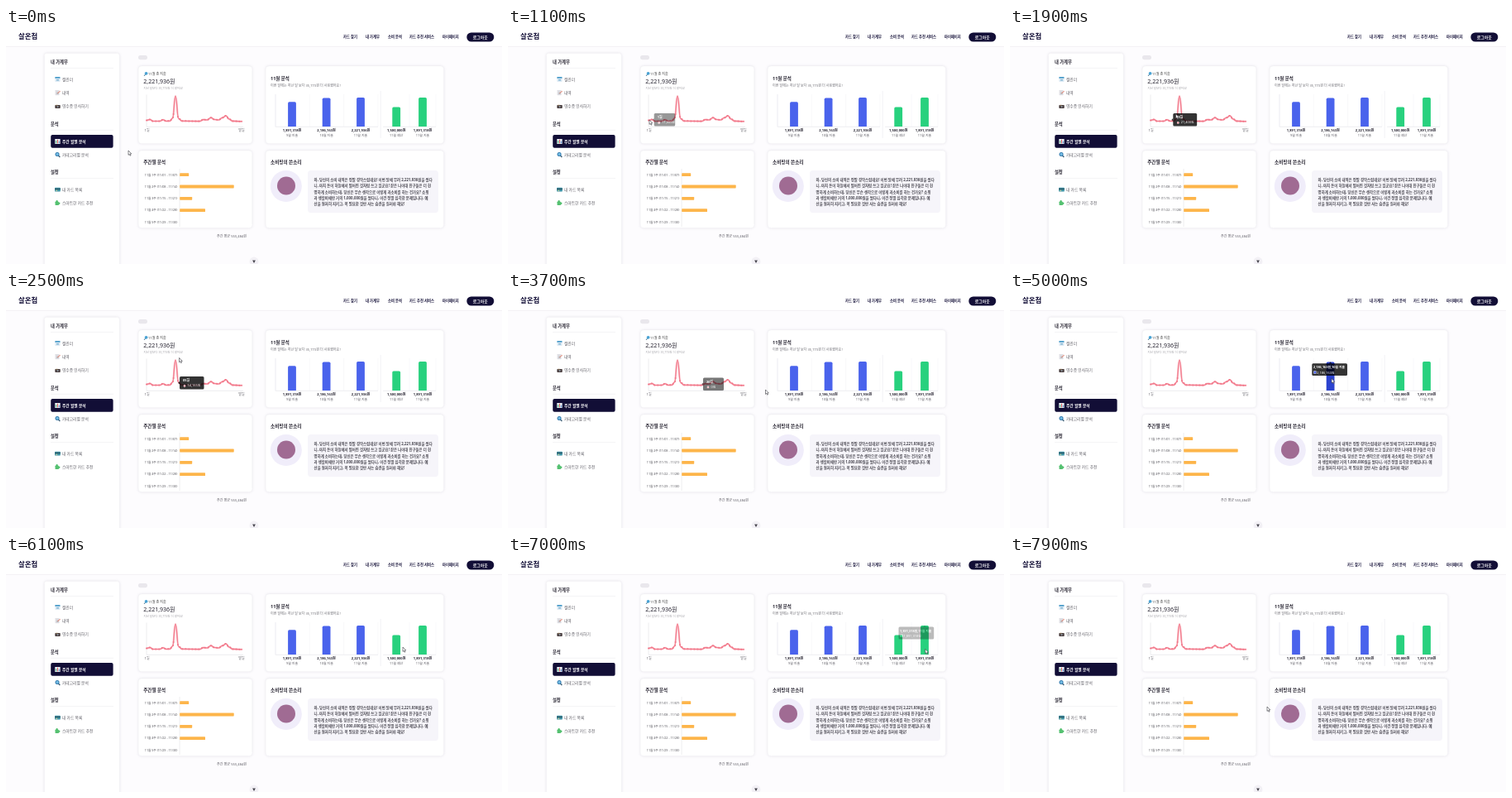
Animation, 600 px wide and 285 px high, one loop 8000 ms. Source, as an HTML page:

```html
<!DOCTYPE html>
<html lang="ko">
<head>
<meta charset="utf-8">
<style>
html, body { margin: 0; width: 100%; height: 100%; overflow: hidden; background: #fdfcfe; }
svg { display: block; width: 600px; height: 285px; }
text { font-family: "Noto Sans", "Noto Sans CJK KR", "Noto Sans CJK", sans-serif; white-space: pre; }
.card { fill: #fff; stroke: #f3f1f5; stroke-width: .4; filter: drop-shadow(0 .8px 1.5px rgba(50, 40, 80, .13)); }
</style>
</head>
<body>
<svg id="stage" viewBox="0 0 600 285"></svg>
<script>
const LOOP = 8000, STEP = 100;
const NAVY = '#120e36', INK = '#25222f', GREY = '#5f5e66', PALE = '#e9e8ec';
const BLUE = '#4a63ec', GREEN = '#28d17e', PINK = '#f2788a', AMBER = '#fdb54a';
const stage = document.getElementById('stage');

function add(tag, attrs, parent = stage) {
  const node = document.createElementNS('http://www.w3.org/2000/svg', tag);
  for (const key in attrs) node.setAttribute(key, attrs[key]);
  parent.appendChild(node);
  return node;
}
const rect = (x, y, width, height, fill, rx = 0, parent) =>
  add('rect', { x, y, width, height, fill, rx }, parent);
const circle = (cx, cy, r, fill, parent) => add('circle', { cx, cy, r, fill }, parent);
const path = (d, stroke, width = .5, fill = 'none', parent) =>
  add('path', { d, stroke, 'stroke-width': width, fill, 'stroke-linejoin': 'round' }, parent);
function label(x, y, content, size, fill = INK, weight = 400, anchor = 'start', parent) {
  const node = add('text', { x, y, fill, 'font-size': size, 'font-weight': weight, 'text-anchor': anchor }, parent);
  node.textContent = content;
  return node;
}
const card = (x, y, width, height) => add('rect', { x, y, width, height, rx: 4, class: 'card' });

function drawHeader() {
  rect(0, 0, 600, 22, '#fff');
  rect(0, 22, 600, .6, '#eeecf1');
  label(15, 13.2, '살온첩', 8.4, NAVY, 700);
  [[408, '카드 찾기'], [435, '내 가계부'], [462, '소비 분석'], [488, '카드 추천 서비스'], [528, '마이페이지']]
    .forEach(([x, name]) => label(x, 12.1, name, 4.3, NAVY, 700));
  rect(557.3, 5.5, 33, 11, NAVY, 5.5);
  label(573.8, 12.7, '로그아웃', 4.9, '#fff', 700, 'middle');
}

const icons = {
  calendar(y) { rect(59.3, y - 3, 6.2, 6, '#dceaf4', .8); rect(59.3, y - 3, 6.2, 1.8, '#4b9cc9', .6); rect(61, y, 3, 1.6, '#8fbdd8'); },
  memo(y) { rect(59.5, y - 3, 5, 6.2, '#dfdfe4', .4); path(`M61 ${y}h2.5M61 ${y + 1.5}h2.5`, '#999'); path(`M62.5 ${y + 1}l3-3`, '#e27058', 1); },
  camera(y) { rect(59.3, y - 1.5, 6.4, 3.9, '#4a3f40', .7); rect(60.3, y - 1.7, 2.2, .8, '#a58a63'); circle(62.6, y + .6, 1.1, '#8d969d'); },
  chart(y) { rect(59.2, y - 3, 6.4, 6, '#e8eef4', .5); rect(60.2, y - 1, 1, 3.3, '#48ad73'); rect(62, y - 2.2, 1, 4.5, '#db5c5c'); rect(63.8, y - .2, 1, 2.5, '#4b85cf'); },
  lens(y) { path(`M63.3 ${y + 1}l2 2`, '#35576f', 1.2); circle(62, y - .6, 2.5, '#2d75a9'); circle(62, y - .6, 1.6, '#75bde4'); },
  credit(y) { rect(59, y - 2.2, 6.8, 4.6, '#3c91a5', .6); rect(59, y - 1.1, 6.8, 1, '#284c58'); rect(60, y + .8, 2.3, .8, '#e4d58e'); },
  puzzle(y) { rect(59.5, y - 1.2, 4.4, 4.2, '#55c171', .4); circle(61.6, y - 1.7, 1.2, '#55c171'); circle(64.2, y + .8, 1.2, '#55c171'); }
};

function drawSidebar() {
  add('rect', { x: 46.5, y: 30.5, width: 90.7, height: 270, rx: 3, class: 'card' });
  [[43.3, '내 가계부'], [118, '분석'], [176.3, '설정']].forEach(([y, name]) => {
    label(54, y, name, 5.3, INK, 700);
    rect(54, y + 4.9, 76, .5, PALE);
  });
  rect(54.2, 128.9, 75.4, 15.9, NAVY, 2);
  [['calendar', 62, '캘린더'], ['memo', 78, '내역'], ['camera', 94.5, '영수증 인식하기'],
   ['chart', 137, '주간 월별 분석'], ['lens', 153, '카테고리별 분석'],
   ['credit', 195, '내 카드 목록'], ['puzzle', 211, '스마트한 카드 추천']]
    .forEach(([icon, y, name]) => {
      const active = icon === 'chart';
      icons[icon](y);
      label(68, y + 1.6, name, 4.75, active ? '#fff' : GREY, active ? 700 : 400);
    });
}

function drawDaily() {
  card(160.2, 46, 137.6, 93.6);
  circle(169.6, 54.8, 1.9, '#4aa3d4');
  path('M168.6 56l-1.6 2', '#35708f', .9);
  label(172, 56.9, '11월 총 지출', 4.1, '#444');
  label(166.3, 66.9, '2,221,936원', 7, INK, 500);
  label(166.5, 74.3, '지난 달보다 35,773원 더 썼어요!', 3.5, '#a5a4aa');
  path('M170 80.5V119.3H287', '#d9d8de', .5);

  const points = [[170, 111.5], [174, 110.5], [178, 112.5], [186, 112.5], [190, 110.8], [194, 112.5], [198, 112.3],
    [201.5, 109], [205, 82], [208.8, 109.5], [213, 112.3], [234, 112.6], [239, 110.6], [243, 111], [248, 108.3],
    [252, 110.5], [257, 111], [262, 108.3], [266, 106], [270, 110], [274, 112.4], [286, 112.8]];
  let d = 'M' + points[0];
  points.slice(1).forEach(([x, y], i) => {
    const [px, py] = points[i], mid = (x + px) / 2;
    d += `C${mid} ${py} ${mid} ${y} ${x} ${y}`;
  });
  path(d, '#f9bcc5', 2.2);
  const line = path(d, PINK, 1.1);
  // Daily markers follow the curve
  const length = line.getTotalLength();
  for (let s = 0; s <= length; s += 4) {
    const { x, y } = line.getPointAtLength(s);
    if (y > 104) circle(x, y, 1, PINK);
  }
  label(167.6, 125.4, '1일', 4, GREY);
  label(281.3, 125.4, '말일', 4, GREY);
}

const monthBars = [
  [346, 89.3, BLUE, '1,891,318원', '9월 지출'],
  [387.6, 84.6, BLUE, '2,186,163원', '10월 지출'],
  [429, 84, BLUE, '2,221,936원', '11월 지출'],
  [472.2, 95.5, GREEN, '1,500,000원', '11월 예산'],
  [504, 84, GREEN, '1,891,318원', '11월 지출']
];
let barNodes;

function drawMonthly() {
  card(314.2, 46, 215.3, 93.6);
  label(320, 63.3, '11월 분석', 5.5, INK, 700);
  label(320, 71, '이번 달에는 지난 달 보다 35,773원 더 사용했어요 !', 4.05, '#6c6b72');
  path('M326 80V119.3H450M367.3 80V119M408.6 80V119M450 80V119M456.3 119.3H520M488 80V119M520 80V119', '#f3f2f5', .5);
  path('M326 80V119.3H450M453.2 76V133M456 119.3H520', '#e3e2e8', .5);
  barNodes = monthBars.map(([x, top, color, sum, name]) => {
    label(x, 125.1, sum, 4.1, INK, 700, 'middle');
    label(x, 130.7, name, 3.95, GREY, 400, 'middle');
    return path(`M${x - 4.9} 119V${top + 1.6}q0-1.6 1.6-1.6h6.6q1.6 0 1.6 1.6V119z`, 'none', 0, color);
  });
}

function drawWeekly() {
  card(160.2, 148, 137.6, 93.4);
  label(166.3, 164.4, '주간별 분석', 5.5, INK, 700);
  rect(209.8, 170, .5, 70, '#dddce2');
  [['01', '07', 11], ['08', '14', 65.5], ['15', '21', 15], ['22', '28', 30.8], ['29', '30', 0]]
    .forEach(([from, to, width], i) => {
      const y = 177.2 + i * 14.3;
      label(207.3, y + 1.3, `11월 ${i + 1}주 (11/${from} - 11/${to})`, 3.65, '#55545b', 400, 'end');
      if (width) rect(210.2, y - 1.9, width, 3.8, AMBER, .6);
    });
  label(255, 252.5, '주간 평균 555,484원', 4.1, GREY);
}

function drawAdvice() {
  card(314.2, 148, 215.3, 93.4);
  label(320, 164.4, '소비핑의 쓴소리', 5.6, INK, 700);
  circle(338.8, 191, 19, '#f0edfa');
  circle(339, 190.5, 11, '#a06b93');
  rect(365, 172, 158, 51.3, '#f6f5fa', 4);
  ['와, 당신의 소비 내역은 정말 경악스럽네요! 이번 달에 무려 2,221,936원을 썼다',
   '니, 마치 돈이 하늘에서 떨어진 것처럼 쓰고 있군요! 같은 나이대 친구들은 더 현',
   '명하게 소비하는데, 당신은 무슨 생각으로 이렇게 과소비를 하는 건가요? 쇼핑',
   '과 생활비에만 거의 1,000,000원을 썼다니, 이건 정말 심각한 문제입니다. 예',
   '산을 철저히 지키고, 꼭 필요한 것만 사는 습관을 길러야 해요!']
    .forEach((line, i) => label(372.6, 184.9 + i * 7.35, line, 4.4, '#48464f', 700));
}

drawHeader();
rect(160, 33, 11, 5.2, '#e9e7ec', 2.6);
drawSidebar();
drawDaily();
drawMonthly();
drawWeekly();
drawAdvice();
circle(300, 282, 5.4, '#f2f0f5');
path('M298.1 280.6h3.8l-1.9 3.4z', 'none', 0, '#44424c');

// Tooltip hovers: stops are [time, left, top, width, title, value]
const hovers = [
  { on: 950, off: 3900, color: PINK, stops: [
    [950, 176.7, 103, 25.5, '1일', '11,665원'],
    [1700, 198, 103, 29, '08일', '21,400원'],
    [2150, 210, 102, 29.5, '05일', '54,165원'],
    [2950, 224, 103, 25, '15일', '0원'],
    [3250, 236, 103.5, 25, '20일', '0원']] },
  barHover(0, 3950, 4500, 327),
  barHover(1, 4450, 5450, 365.3),
  barHover(2, 5420, 5900, 407.5),
  barHover(4, 6150, 7100, 472.5)
];
function barHover(bar, on, off, left) {
  const [, top, color, sum, name] = monthBars[bar];
  return { bar, on, off, color, stops: [[on, left, top + 1.6, 42.7, `${sum},${name}`, sum]] };
}

const tips = hovers.map(({ color, bar }) => {
  const group = add('g', {}), isDaily = bar === undefined;
  const caret = path('', 'none', 0, '#000', group);
  const box = rect(0, 0, 10, isDaily ? 15.5 : 14.8, '#000', 1.5, group);
  caret.setAttribute('fill-opacity', .8);
  box.setAttribute('fill-opacity', .8);
  if (isDaily) {
    circle(6, 11.4, 1.3, '#fff', group);
    circle(6, 11.4, .9, color, group);
  } else {
    rect(2, 9.2, 3.2, 3.2, '#fff', 0, group);
    rect(2.3, 9.5, 2.6, 2.6, color, 0, group);
  }
  const title = label(isDaily ? 4 : 1.6, 6.1, '', isDaily ? 4 : 3.85, '#fff', 700, 'start', group);
  const value = label(isDaily ? 9.5 : 6, 12.4, '', 3.9, '#fff', 400, 'start', group);
  return { group, caret, box, title, value };
});

const cursor = path('M0 0V5.4L1.2 4.3L2.1 6.2L3 5.8L2.2 3.9H3.8Z', '#2a2a30', .55, '#fff');
const route = [
  [0, 148, 148], [400, 151, 143], [900, 171, 111], [1300, 171, 111], [1750, 198, 108], [2200, 208, 92],
  [2500, 209.5, 79.5], [2800, 216, 94], [3250, 246, 110], [3700, 311.5, 118], [4050, 345, 109],
  [4550, 387, 105], [5000, 389, 104.5], [5300, 418, 107], [5500, 430, 108], [5850, 479, 110],
  [6100, 480, 110], [6350, 504, 106], [6900, 505, 109], [7200, 504, 122], [7700, 311, 182], [8000, 311, 182]
];

const clamp = v => Math.max(0, Math.min(1, v));
const ease = v => v * v * (3 - 2 * v);
const mix = (a, b, k) => a + (b - a) * k;

function pointerAt(t) {
  const i = route.findIndex(stop => stop[0] > t);
  const a = route[i - 1], b = route[i], k = ease((t - a[0]) / (b[0] - a[0]));
  return [mix(a[1], b[1], k), mix(a[2], b[2], k)];
}

function showTip(tip, { on, off, stops, bar }, t) {
  const isDaily = bar === undefined;
  const alpha = Math.min(clamp((t - on) / 300), clamp((off - t) / 300));
  tip.group.setAttribute('opacity', alpha);
  if (!isDaily) {
    const hot = t >= on && t < off - 300, color = monthBars[bar][2];
    barNodes[bar].setAttribute('fill', !hot ? color : color === BLUE ? '#2c43cf' : '#17b467');
  }
  if (!alpha) return;
  const i = Math.max(0, stops.filter(stop => stop[0] <= t).length - 1);
  const now = stops[i], last = stops[Math.max(0, i - 1)], k = 1 - (1 - clamp((t - now[0]) / 350)) ** 4;
  const [x, y, w] = [1, 2, 3].map(n => mix(last[n], now[n], k));
  tip.group.setAttribute('transform', `translate(${x} ${y})`);
  tip.box.setAttribute('width', w);
  tip.caret.setAttribute('d', isDaily ? 'M0 6L-1.8 7.8L0 9.6Z' : `M${monthBars[bar][0] - x - 1.7} 0l1.7-1.7l1.7 1.7z`);
  tip.title.textContent = now[4];
  tip.value.textContent = now[5];
}

function render(ms) {
  const t = Math.floor((ms % LOOP) / STEP) * STEP;
  hovers.forEach((hover, i) => showTip(tips[i], hover, t));
  cursor.setAttribute('transform', `translate(${pointerAt(t)})`);
}

const start = performance.now();
function tick() {
  render(performance.now() - start);
  requestAnimationFrame(tick);
}
tick();
</script>
</body>
</html>
```
